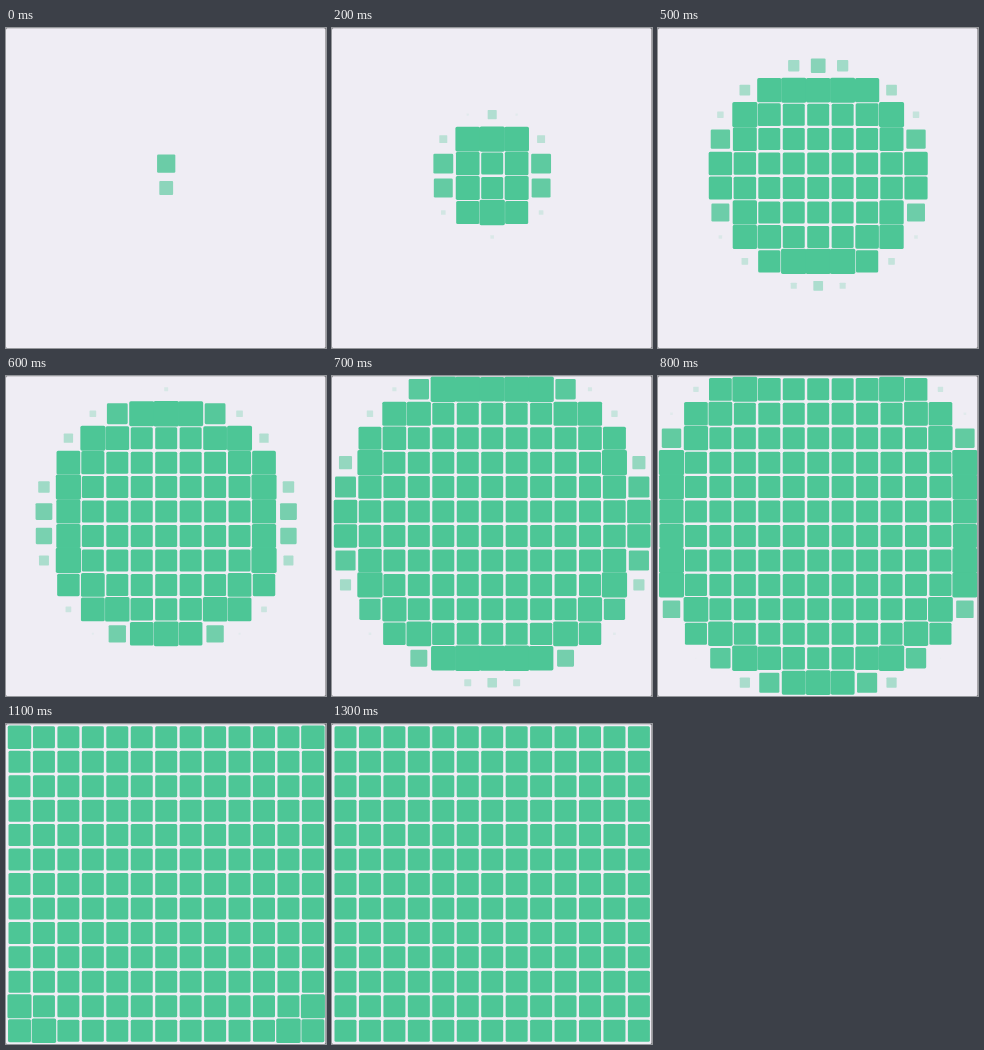
Write an HTML page that moves like this. It is 320x320 px and loops after 1400 ms.

```html
<!DOCTYPE html>
<html lang="en">
<head>
<meta charset="utf-8">
<title>Tile ripple</title>
<style>
  html, body { margin: 0; width: 100%; height: 100%; overflow: hidden; background: #77767a; }
  svg { display: block; width: 100%; height: 100%; }
</style>
</head>
<body>
<svg viewBox="0 0 320 320">
  <defs>
    <clipPath id="card"><rect y="0.2" width="319.4" height="319.8" rx="1.5"/></clipPath>
  </defs>
  <g clip-path="url(#card)">
    <rect width="320" height="320" fill="#efedf4"/>
    <g id="tiles" fill="#4dc696"></g>
  </g>
</svg>
<script>
const COUNT = 13, MID = 6, PITCH = 24.45;
const SIZE = 22, PEAK = 25.4;
const CENTER = { x: 160.2, y: 160 };
const ORIGIN_ROW = 5.42;
const STEP = 100, STEPS = 14;

// Where a tile starts, peaks and rests, in cells behind the wave
const BEGIN = -0.24, TOP = 0.87, REST = 1.8;

// Wave radius in cells: fast, slower in the middle, fast again.
// The wave skips one beat halfway through the loop.
function waveRadius(step) {
  const beat = step < STEPS / 2 ? step : step + 1;
  const t = beat - STEPS / 2;
  return 5.95 + 0.66 * t + 0.0017 * t ** 3;
}

// Sine growth to the peak, then a cosine ease back to the resting size
function tileSize(x) {
  if (x <= BEGIN) return 0;
  if (x < TOP) return PEAK * Math.sin(Math.PI / 2 * (x - BEGIN) / (TOP - BEGIN));
  const settle = Math.min(1, (x - TOP) / (REST - TOP));
  return SIZE + (PEAK - SIZE) * (1 + Math.cos(Math.PI * settle)) / 2;
}

const group = document.getElementById('tiles');
const tiles = [];
for (let row = 0; row < COUNT; row++) {
  for (let col = 0; col < COUNT; col++) {
    const el = document.createElementNS('http://www.w3.org/2000/svg', 'rect');
    group.appendChild(el);
    tiles.push({
      el,
      x: CENTER.x + (col - MID) * PITCH,
      y: CENTER.y + (row - MID) * PITCH,
      dist: Math.hypot(col - MID, row - ORIGIN_ROW)
    });
  }
}

function draw(step) {
  const radius = waveRadius(step);
  for (const { el, x, y, dist } of tiles) {
    const size = tileSize(radius - dist);
    const attrs = {
      x: x - size / 2, y: y - size / 2, width: size, height: size,
      rx: 1.5 * size / SIZE, opacity: Math.min(1, (size / SIZE) ** 1.1)
    };
    for (const name in attrs) el.setAttribute(name, attrs[name].toFixed(2));
  }
}

const start = performance.now();
function tick() {
  const elapsed = performance.now() - start;
  draw(Math.floor(elapsed / STEP) % STEPS);
  requestAnimationFrame(tick);
}
tick();
</script>
</body>
</html>
```
